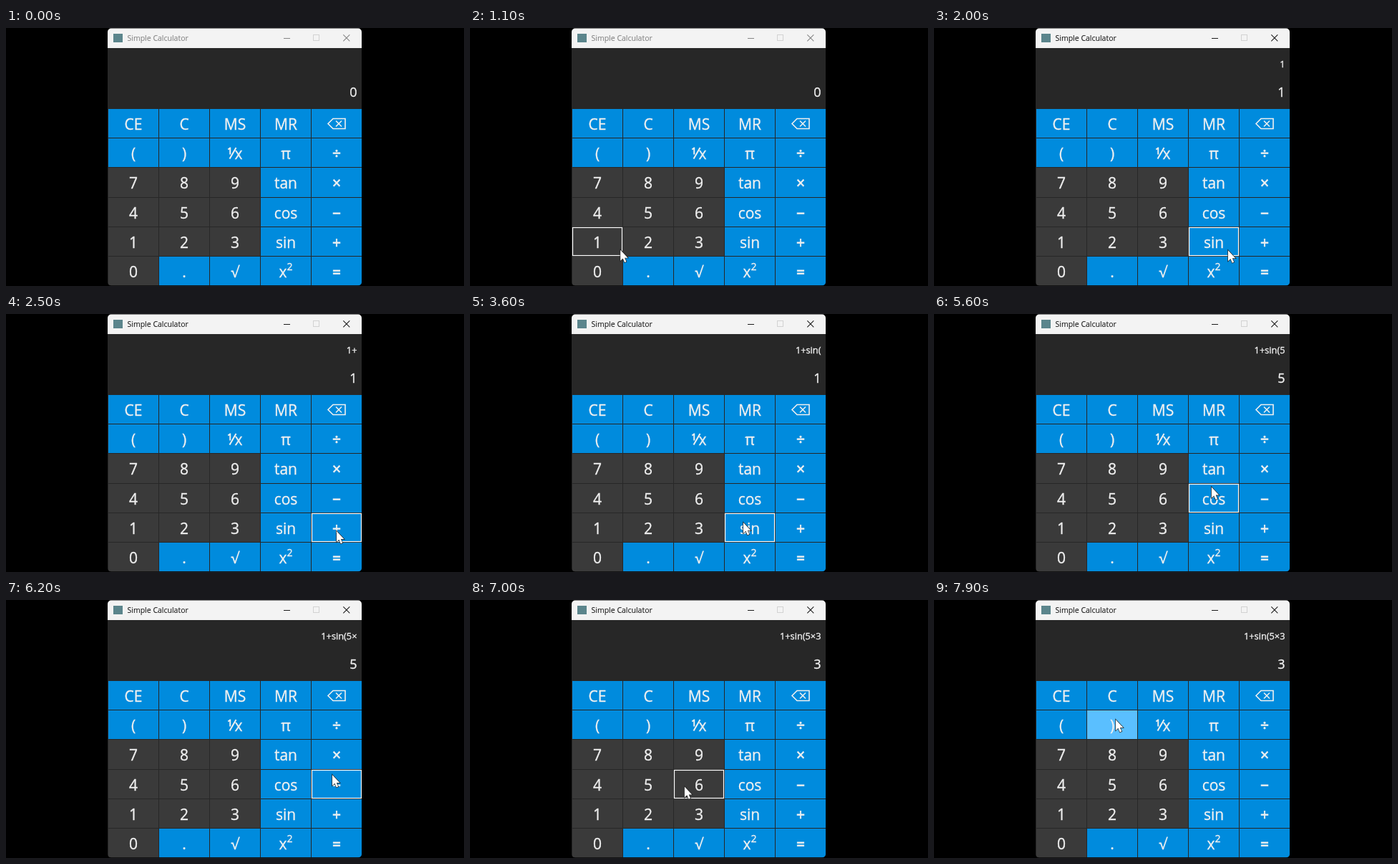
Animation of 640x360 px, one loop 8000 ms. Source, as an HTML page with a canvas:

```html
<!DOCTYPE html>
<html lang="en">
<head>
<meta charset="utf-8">
<title>Simple Calculator</title>
<style>
  html, body { margin: 0; width: 100%; height: 100%; overflow: hidden; background: #000; }
  canvas { display: block; width: 100vw; height: 100vh; }
</style>
</head>
<body>
<canvas id="stage" width="640" height="360"></canvas>
<script>
const ctx = document.getElementById('stage').getContext('2d');
const DURATION = 8000, STEP = 100;
const LEFT = 142, TOP = 112.4, WIDTH = 355, CELL_W = WIDTH / 5, CELL_H = 41.25;
const FONT = '"Open Sans", "Noto Sans", sans-serif';
const INK = '#f0f0f0';

const KEYS = [
  ['CE', 'C', 'MS', 'MR', 'erase'],
  ['(', ')', 'inverse', 'π', '÷'],
  ['7', '8', '9', 'tan', '×'],
  ['4', '5', '6', 'cos', '−'],
  ['1', '2', '3', 'sin', '+'],
  ['0', '.', '√', 'square', '='],
];

// The pointer visits one key after another; dx, dy is its offset from the key's centre.
const VISITS = [
  { key: '1', leave: 900, arrive: 1200, click: 1600, dx: 6 },
  { key: '+', leave: 1600, arrive: 2300, click: 2400, dy: 5 },
  { key: 'sin', leave: 2600, arrive: 3400, click: 3600, dx: -9, dy: -7 },
  { key: '5', leave: 4200, arrive: 5300, click: 5400, dx: 7, dy: 14 },
  { key: '×', leave: 5400, arrive: 5900, click: 6000 },
  { key: '−', leave: 6000, arrive: 6200, dx: -6, dy: -13 },
  { key: '3', leave: 6200, arrive: 6700, click: 6900 },
  { key: ')', leave: 6900, arrive: 7500, dx: 5, dy: -7 },
];
const ENTRY = { x: 420, y: 345 };
const FOCUS = VISITS[0].click, PRESS = 7900;

function cell(r, c) {
  const x = LEFT + c * CELL_W + 1, y = Math.floor(TOP + r * CELL_H) + 1;
  const w = CELL_W - 1, h = Math.floor(TOP + (r + 1) * CELL_H) - y;
  return { x, y, w, h, cx: x + w / 2, cy: y + h / 2 };
}

function stopAt({ key, dx = 0, dy = 0 }) {
  const r = KEYS.findIndex(row => row.includes(key));
  const { cx, cy } = cell(r, KEYS[r].indexOf(key));
  return { x: cx + dx, y: cy + dy };
}

function pointerAt(t) {
  const i = VISITS.findLastIndex(v => v.leave <= t);
  if (i < 0) return null;
  const { leave, arrive } = VISITS[i];
  const from = i ? stopAt(VISITS[i - 1]) : ENTRY, to = stopAt(VISITS[i]);
  const u = Math.min(1, (t - leave) / (arrive - leave));
  const ease = u * (2 - u);
  const sag = .12 * Math.hypot(to.x - from.x, to.y - from.y) * u * (1 - u);
  return {
    x: from.x + (to.x - from.x) * ease,
    y: from.y + (to.y - from.y) * ease + sag,
  };
}

function displayAt(t) {
  const typed = VISITS.filter(v => v.click <= t).map(v => v.key);
  return {
    expression: typed.join('').replace('sin', 'sin('),
    value: typed.findLast(key => /\d/.test(key)) ?? '0',
  };
}

function text(str, x, y, size, { align = 'center', color = INK, weight = .35 } = {}) {
  ctx.font = `${size}px ${FONT}`;
  ctx.textAlign = align;
  ctx.fillStyle = ctx.strokeStyle = color;
  ctx.lineWidth = weight;
  ctx.fillText(str, x, y);
  ctx.strokeText(str, x, y);
}

function box(x, y, w, h, color) {
  ctx.fillStyle = color;
  ctx.fillRect(x, y, w, h);
}

function frameBox(x, y, w, h, color, width = 1) {
  ctx.strokeStyle = color;
  ctx.lineWidth = width;
  ctx.strokeRect(x + .5, y + .5, w - 1, h - 1);
}

function line(points, color, width = 1, close = false) {
  ctx.beginPath();
  points.forEach(([x, y]) => ctx.lineTo(x, y));
  if (close) ctx.closePath();
  ctx.strokeStyle = color;
  ctx.lineWidth = width;
  ctx.stroke();
}

function cross(x, y, r, color, width) {
  line([[x - r, y - r], [x + r, y + r]], color, width);
  line([[x - r, y + r], [x + r, y - r]], color, width);
}

const SPECIAL = {
  erase(x, y) {
    line([[x - 12, y], [x - 5, y - 7], [x + 12, y - 7], [x + 12, y + 7], [x - 5, y + 7]], INK, 1.6, true);
    cross(x + 3, y, 4, INK, 1.6);
  },
  inverse(x, y) {
    text('1', x - 7, y + 1, 13, { weight: .9 });
    line([[x - 7.5, y + 8], [x + 1.5, y - 7.5]], INK, 2);
    text('x', x + 5, y + 8, 21);
  },
  square(x, y) {
    text('x', x - 4, y + 8, 21);
    text('2', x + 5.5, y - 2, 14);
  },
};

function drawTitle(active) {
  const color = active ? '#1c1c1c' : '#858585';
  box(LEFT, 0, WIDTH, 28, '#f3f3f3');
  box(150, 8, 13, 12, '#5b858c');
  text('Simple Calculator', 169.5, 18, 10.5, { align: 'left', color, weight: .1 });
  line([[388, 14.5], [397, 14.5]], color);
  frameBox(429, 9, 9, 9, '#d2d2d2');
  cross(475.8, 13.8, 4.5, color, 1.1);
}

function drawKey(key, r, c, pointer, pressed) {
  const { x, y, w, h, cx, cy } = cell(r, c);
  const hover = pointer && Math.abs(pointer.x - cx) < w / 2 && Math.abs(pointer.y - cy) < h / 2;
  const blue = r < 2 || c > 2 || /[.√]/.test(key);
  box(x, y, w, h, hover && pressed ? '#5abfff' : blue ? '#008bdd' : '#3a3a3a');
  if (SPECIAL[key]) SPECIAL[key](cx, cy + .5);
  else text(key, cx, cy + 8.5, 21, { weight: /[÷×−+=]/.test(key) ? .7 : .35 });
  if (hover && !pressed) frameBox(x, y, w, h, '#fff', 1.2);
}

function drawPointer({ x, y }) {
  const shape = [[0, 0], [0, 15], [3.4, 11.8], [5.8, 17.4], [8.2, 16.3], [5.9, 11], [10.3, 11]];
  line(shape.map(([dx, dy]) => [x + dx, y + dy]), '#222', 1.4, true);
  ctx.fillStyle = '#fff';
  ctx.fill();
}

function draw(t) {
  const pointer = pointerAt(t), { expression, value } = displayAt(t);
  box(0, 0, 640, 360, '#000');
  ctx.save();
  ctx.beginPath();
  ctx.roundRect(LEFT, .5, WIDTH, 359, 5);
  ctx.clip();
  box(LEFT, 28, WIDTH, 332, '#272727');
  drawTitle(t >= FOCUS);
  text(expression, 490.5, 55, 12.8, { align: 'right' });
  text(value, 490.5, 96, 18, { align: 'right' });
  KEYS.forEach((row, r) => row.forEach((key, c) => drawKey(key, r, c, pointer, t >= PRESS)));
  ctx.restore();
  if (pointer) drawPointer(pointer);
}

let start;
function frame(now) {
  start ??= now;
  const t = (now - start) % DURATION;
  draw(Math.floor(t / STEP) * STEP);
  requestAnimationFrame(frame);
}
requestAnimationFrame(frame);
</script>
</body>
</html>
```
